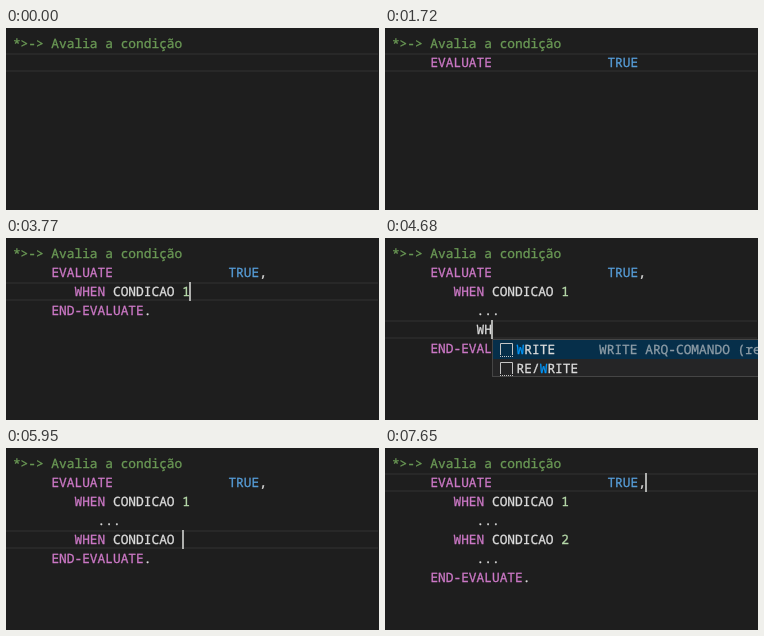
Animation, 373 px wide and 182 px high, one loop 8000 ms. Source, as an HTML page:

```html
<!DOCTYPE html>
<html lang="pt">
<head>
<meta charset="utf-8">
<title>Avalia a condição</title>
<style>
  html, body { margin: 0; width: 100%; height: 100%; overflow: hidden; background: #1e1e1e; }
  svg { display: block; width: 373px; height: 182px; }
  text {
    font: 12.83px "Noto Sans Mono", "DejaVu Sans Mono", monospace;
    text-rendering: geometricPrecision;
    white-space: pre;
    color: #dcdcdc;
    fill: currentColor;
    stroke: currentColor;
    stroke-width: 0.3px;
  }
  .comment { color: #6a9955; }
  .keyword { color: #cc78c6; }
  .constant { color: #569cd6; }
  .number { color: #b5d8a8; }
  .match { color: #0097fb; }
  .detail { color: #8d9ca6; }
  .icon { fill: none; stroke: #c5c5c5; }
</style>
</head>
<body>
<svg id="stage" viewBox="0 0 373 182"></svg>
<script>
const LOOP = 8000, CHAR = 7.697, LEFT = 6.9, ROW = 19, TOP = 6;
const colX = col => LEFT + col * CHAR;
const rowY = row => TOP + row * ROW;
const indent = n => ' '.repeat(n);

// Completion lists
const keywordIcon = '<path class="icon" d="M1.5 2.5h6v2h-6zM10 3.5h5M1 6.5h9m2 0h2M1 9.5h6m3 0h5M1 12.5h11"/>';
const snippetIcon = '<path class="icon" d="M2.5 13V1.5h12V13"/><path class="icon" stroke-dasharray="1" d="M2 14.5h13"/>';
const evaluate = { label: 'Gerar comando EVALUATE', icon: keywordIcon };
const evaluateList = (match, ...others) => ({
  match, detail: 'Gera a declaração EVALUATE', detailX: 207,
  items: [evaluate, ...others.map(label => ({ label, icon: snippetIcon }))]
});
const writeList = {
  match: 'W', detail: 'WRITE ARQ-COMANDO (registro)', detailX: 107,
  items: ['WRITE', 'RE/WRITE'].map(label => ({ label, icon: snippetIcon }))
};
const whenList = {
  match: 'WHEN', detail: 'Gera a declaração WHEN', detailX: 177,
  items: ['Gerar comando WHEN', 'WHEN', 'WHEN OTHER'].map(label => ({ label, icon: keywordIcon }))
};

// Editing session: each step is the editor state from time t on
let now = { t: 0, lines: ['*>-> Avalia a condição', ''], row: 1, col: 5, caret: false, popup: null };
const steps = [now];

function at(t, change) {
  now = { ...now, caret: true, popup: null, ...change, t };
  steps.push(now);
}
function insert(t, text, popup = null) {
  const { row, col } = now, lines = [...now.lines];
  const line = lines[row].padEnd(col);
  lines[row] = line.slice(0, col) + text + line.slice(col);
  at(t, { lines, col: col + text.length, popup });
}
function type(from, to, text) {
  [...text].forEach((c, i) => insert(from + (to - from) * i / (text.length - 1), c));
}
function newline(t, col) {
  const row = now.row + 1, lines = [...now.lines];
  lines.splice(row, 0, '');
  at(t, { lines, row, col });
}
function replaceFrom(t, row, fresh, change) {
  at(t, { lines: [...now.lines.slice(0, row), ...fresh, ...now.lines.slice(row + fresh.length)], row, ...change });
}

insert(170, 'E');
at(245, { popup: evaluateList('E', 'EJECT', 'ENTRY', 'EXEC SQL', 'EXIT', 'EXIT PROGRAM') });
insert(320, 'V', evaluateList('EV'));
insert(550, 'A', evaluateList('EVA'));
replaceFrom(1020, 1, [(indent(5) + 'EVALUATE').padEnd(28) + 'TRUE'], { col: 32, caret: false });
at(1190, {});
at(1720, { caret: false });
insert(2200, ',');
replaceFrom(2310, 2, [indent(8) + 'WHEN ', indent(5) + 'END-EVALUATE.'], { col: 13 });
type(2410, 3230, 'CONDICAO');
insert(3460, ' ');
insert(3770, '1');
newline(3840, 11);
type(3960, 4180, '...');
newline(4300, 11);
insert(4460, 'W');
at(4570, { popup: writeList });
insert(4680, 'H', writeList);
insert(4760, 'E');
insert(4830, 'N', whenList);
replaceFrom(4920, 4, [indent(8) + 'WHEN '], { col: 13 });
type(5010, 5700, 'CONDICAO');
insert(5950, ' ');
insert(6100, '2');
newline(6250, 11);
type(6370, 6600, '...');
at(6870, { row: 3 });
at(7040, { row: 2 });
at(7270, { row: 1 });
at(7650, { col: 33 });

// Drawing
const rect = (x, y, w, h, fill) => `<rect x="${x}" y="${y}" width="${w}" height="${h}" fill="${fill}"/>`;
const label = (x, y, text, kind = '') => `<text x="${x}" y="${y}" class="${kind}">${text}</text>`;

const token = /(?<comment>\*>.*)|(?<keyword>END-EVALUATE|EVALUATE|WHEN)|(?<constant>TRUE)|(?<number>\d)|[A-Z]+|[.,]+/g;

function drawLine(line, row) {
  return [...line.matchAll(token)].map(m => {
    const kind = Object.keys(m.groups).find(k => m.groups[k]);
    return label(colX(m.index), rowY(row) + 14, m[0], kind);
  }).join('');
}

function drawItem({ label: text, icon }, i, match) {
  const start = text.indexOf(match), y = i * ROW + 15;
  const part = (from, to, kind) => label(24.6 + from * CHAR, y, text.slice(from, to), kind);
  const body = start < 0 ? part(0) :
    part(0, start) + part(start, start + match.length, 'match') + part(start + match.length);
  return `<g transform="translate(6 ${i * ROW + 3})">${icon}</g>` + body;
}

function drawPopup({ items, match, detail, detailX }, x, y) {
  const height = items.length * ROW;
  return `<g transform="translate(${x} ${y})">` +
    rect(0, 0, 400, height, '#454545') +
    rect(1, 1, 398, height - 2, '#252526') +
    rect(1, 1, 398, Math.min(ROW, height - 1), '#062f4a') +
    items.map((item, i) => drawItem(item, i, match)).join('') +
    label(detailX, 15, detail, 'detail') + '</g>';
}

function draw({ lines, row, col, caret, popup }) {
  const x = Math.floor(colX(col)), y = rowY(row);
  return rect(0, y, 372, 2, '#282828') + rect(0, y + ROW - 2, 372, 2, '#282828') +
    lines.map(drawLine).join('') +
    (popup ? drawPopup(popup, x + 1, y + ROW) : '') +
    (caret ? rect(x, y, 2, ROW, '#aeafad') : '');
}

const stage = document.getElementById('stage');
const start = performance.now();
let shown;

function render() {
  const t = Math.max(0, performance.now() - start) % LOOP;
  const step = steps.findLast(s => s.t <= t);
  if (step !== shown) stage.innerHTML = draw(shown = step);
  requestAnimationFrame(render);
}
render();
</script>
</body>
</html>
```
